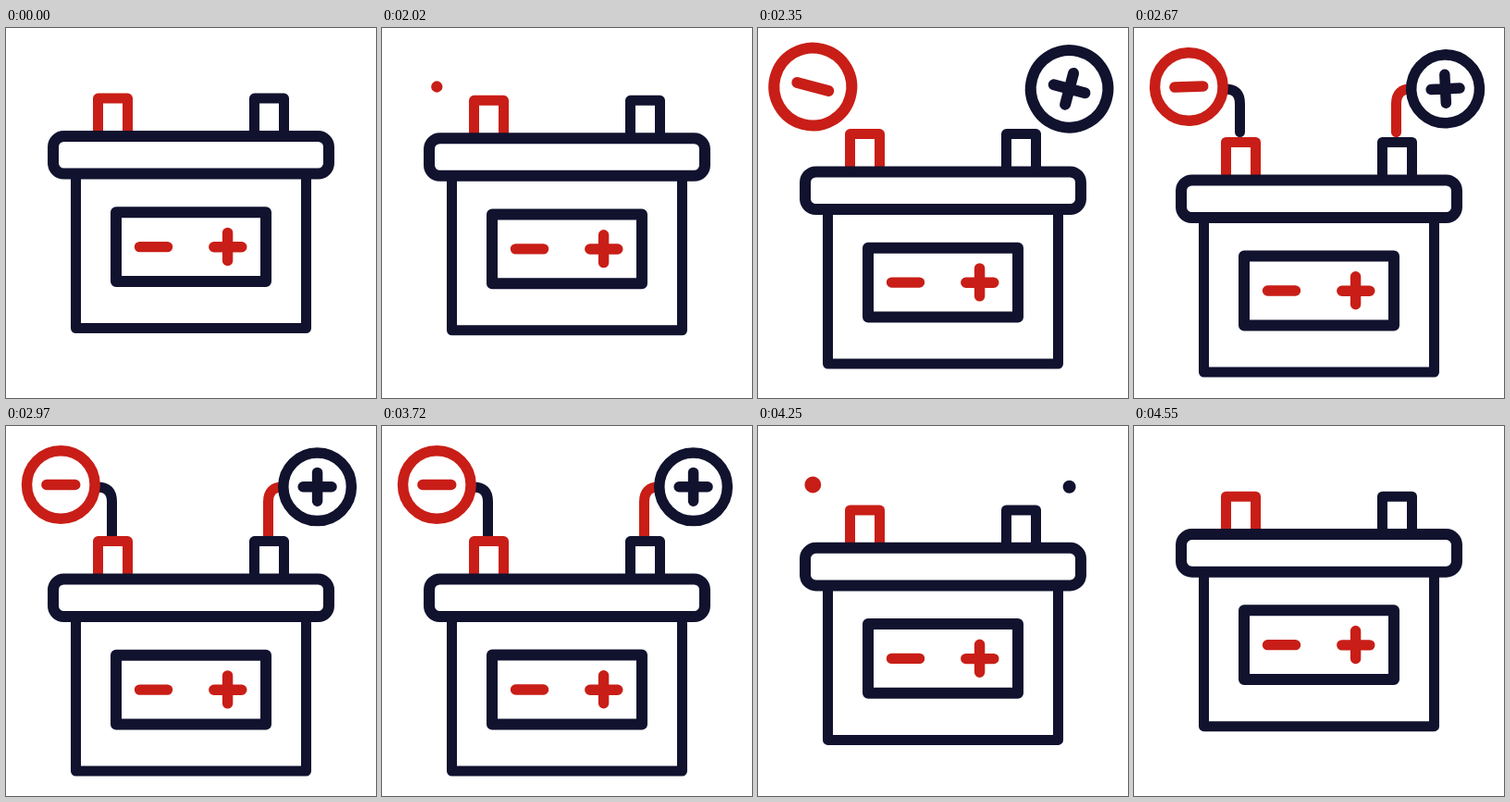
Write an HTML page that moves like this. It is 400 px wide and 400 px high and loops after 4.57 s.

```html
<!DOCTYPE html>
<html lang="en">
<head>
<meta charset="utf-8">
<title>Battery terminals</title>
<style>
  html, body { margin: 0; width: 100%; height: 100%; overflow: hidden; background: #fff; }
  svg { display: block; width: 100vw; height: 100vh; }
  path, rect, circle { fill: none; stroke-linecap: round; stroke-linejoin: round; }
  svg { stroke-width: 11; }
  .bold { stroke-width: 12; }
  .red { stroke: #c81e17; }
  .navy { stroke: #10122e; }
</style>
</head>
<body>
<svg viewBox="0 0 400 400">
  <path id="wireL" class="navy" pathLength="1" d="M98 66C109 66 114.5 71 114.5 82V122"/>
  <path id="wireR" class="red" pathLength="1" d="M299 66C289 66 283.5 71 283.5 82V122"/>
  <g id="battery">
    <path class="red" d="M99.5 114V76.1H131.5V114"/>
    <path class="navy" d="M268.5 114V76.1H300.5V114"/>
    <path class="navy" d="M75.5 160V324.6H324.5V160"/>
    <rect class="navy bold" x="51" y="117" width="298" height="40.6" rx="11.5"/>
    <rect class="navy bold" x="119" y="199.2" width="162" height="74.8"/>
    <path class="red" stroke-width="11.4" d="M144.5 236.6H174.5M224.8 236.8H254.8M239.6 221.4V251.4"/>
  </g>
  <g id="minus" class="red"><circle/><path/></g>
  <g id="plus" class="navy"><circle/><path/></g>
</svg>
<script>
const LOOP = 4570, HOLD = 2020, DROP = 48.5;
const $ = id => document.getElementById(id);
const clamp = x => Math.min(1, Math.max(0, x));
const smooth = x => x * x * (3 - 2 * x);
const span = (t, a, b) => clamp((t - a) / (b - a));

function bezier(x1, y1, x2, y2) {
  const at = (s, a, b) => 3 * (1 - s) ** 2 * s * a + 3 * (1 - s) * s * s * b + s ** 3;
  return x => {
    let lo = 0, hi = 1;
    for (let i = 0; i < 24; i++) {
      const mid = (lo + hi) / 2;
      if (at(mid, x1, x2) < x) lo = mid; else hi = mid;
    }
    return at(lo, y1, y2);
  };
}
const settle = bezier(0.12, 0.18, 0.15, 1);

// Smoothly eased value through [time, value] keys
function keyed(t, keys) {
  let value = keys[0][1];
  for (let i = 1; i < keys.length; i++) {
    const [a, from] = keys[i - 1], [b, to] = keys[i];
    if (t >= a) value = from + (to - from) * smooth(span(t, a, b));
  }
  return value;
}

const badges = [
  { el: $("minus"), x: 59.3, y: 63.5, plus: false,
    scale: [[1968, 0], [2365, 1.145], [2670, 1], [4030, 1], [4315, 0]],
    turn: [[1990, 0], [2360, 15], [2680, -2], [2960, 0]] },
  { el: $("plus"), x: 336.6, y: 65.8, plus: true,
    scale: [[2022, 0], [2370, 1.145], [2700, 1], [4015, 1], [4300, 0]],
    turn: [[2022, 0], [2370, 15], [2690, -3], [2970, 0]] }
];

function drawBadge({ el, x, y, plus, scale, turn }, t) {
  const s = keyed(t, scale), arm = 15.4 * s;
  el.style.display = s > 0.001 ? "" : "none";
  el.setAttribute("transform", `translate(${x} ${y}) rotate(${keyed(t, turn)})`);
  el.setAttribute("stroke-width", 8 + 3.5 * s);
  el.firstChild.setAttribute("r", 36.8 * s);
  el.lastChild.setAttribute("d", `M${-arm} 0H${arm}` + (plus ? `M0 ${-arm}V${arm}` : ""));
}

function draw(time) {
  const t = time < HOLD ? 0 : time;
  const y = DROP * (settle(span(t, 2000, 2870)) - smooth(span(t, 3700, LOOP)));
  $("battery").setAttribute("transform", `translate(0 ${y})`);

  const length = smooth(span(t, 2450, 2740)) - span(t, 3720, 4155);
  for (const id of ["wireL", "wireR"]) {
    $(id).style.display = length > 0.001 ? "" : "none";
    $(id).setAttribute("stroke-dasharray", `${length} 2`);
  }
  badges.forEach(badge => drawBadge(badge, t));
}

const start = performance.now();
function tick(now) {
  draw(Math.max(0, now - start) % LOOP);
  requestAnimationFrame(tick);
}
draw(0);
requestAnimationFrame(tick);
</script>
</body>
</html>
```
